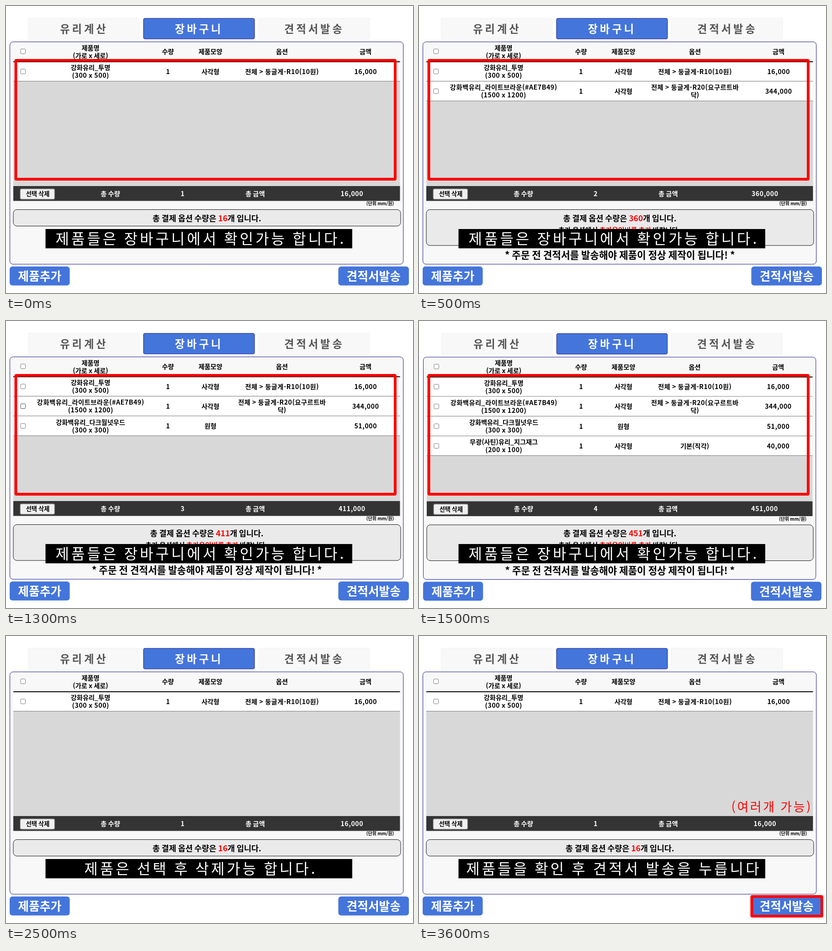
An HTML page with a canvas that plays this animation: 891x628 px, repeating every 4 s.

```html
<!DOCTYPE html>
<html lang="ko">
<head>
<meta charset="utf-8">
<title>장바구니</title>
<style>
  html, body { margin: 0; width: 100%; height: 100%; overflow: hidden; background: #fff; }
  canvas { display: block; }
</style>
</head>
<body>
<canvas id="stage" width="891" height="628"></canvas>
<script>
const ctx = document.getElementById('stage').getContext('2d');
const FONT = '"Noto Sans CJK KR", "Noto Sans CJK", "Noto Sans CJK JP", sans-serif';
const BLUE = '#4475db', NAVY = '#17178a', RED = '#ff0000';
const COLS = [185, 354.5, 447.5, 604, 787];
const ROW_H = 43.2;

const items = [
  { name: ['강화유리_투명', '(300 x 500)'], shape: '사각형', option: ['전체 > 둥글게-R10(10원)'], price: 16000 },
  { name: ['강화백유리_라이트브라운(#AE7B49)', '(1500 x 1200)'], shape: '사각형', option: ['전체 > 둥글게-R20(요구르트바', '닥)'], price: 344000 },
  { name: ['강화백유리_다크월넛우드', '(300 x 300)'], shape: '원형', option: [], price: 51000 },
  { name: ['무광(사틴)유리_지그재그', '(200 x 100)'], shape: '사각형', option: ['기본(직각)'], price: 40000 }
];

const captions = [
  '제품들은 장바구니에서 확인가능 합니다.',
  '제품은 선택 후 삭제가능 합니다.',
  '제품들을 확인 후 견적서 발송을 누릅니다'
];

// One scene per half second; the last one holds until the loop ends.
const listFrame = [[18.5, 116, 855, 382]];
const scenes = [
  { rows: 1, caption: 0, marks: listFrame },
  { rows: 2, caption: 0, marks: listFrame },
  { rows: 3, caption: 0, marks: listFrame, hover: 1 },
  { rows: 4, caption: 0, marks: listFrame, inset: true },
  { rows: 4, caption: 1, marks: [[22, 163, 53, 295], [27, 395, 111, 429]], inset: true, checked: true },
  { rows: 1, caption: 1, marks: [] },
  { rows: 1, caption: 2, marks: [[725.5, 567, 885, 616]], note: true }
];

function box(x1, y1, x2, y2, radius, fill, stroke, width = 1) {
  ctx.beginPath();
  ctx.roundRect(x1, y1, x2 - x1, y2 - y1, radius);
  if (fill) { ctx.fillStyle = fill; ctx.fill(); }
  if (stroke) { ctx.strokeStyle = stroke; ctx.lineWidth = width; ctx.stroke(); }
}

function setFont(size, weight, spacing) {
  ctx.font = `${weight} ${size}px ${FONT}`;
  ctx.letterSpacing = spacing + 'px';
}

// Centres a line of [string, colour] parts on (x, y).
function line(parts, x, y, size, { weight = 700, spacing = 0 } = {}) {
  setFont(size, weight, spacing);
  const widths = parts.map(([s]) => ctx.measureText(s).width);
  let left = x - (widths.reduce((a, b) => a + b) - spacing) / 2;
  parts.forEach(([s, color], i) => {
    ctx.fillStyle = color;
    ctx.fillText(s, left, y + size * 0.37);
    left += widths[i];
  });
}

const text = (s, x, y, size, color = '#000', style) => line([[s, color]], x, y, size, style);

function cell(s, x, y, color) {
  text(String(s), x, y, 14.2, color, { spacing: /\d/.test(s) ? 0.55 : 0 });
}

function lines(list, x, y) {
  list.forEach((s, i) => cell(s, x, y + (i - (list.length - 1) / 2) * 17));
}

function checkbox(y, checked, hover) {
  box(32, y - 5.2, 42.5, y + 5.2, 2, checked ? '#0b6bdc' : '#fff',
      checked ? '#0b6bdc' : hover ? '#444' : '#777');
  if (!checked) return;
  ctx.beginPath();
  ctx.moveTo(34, y);
  ctx.lineTo(36.4, y + 2.6);
  ctx.lineTo(40.7, y - 2.8);
  ctx.strokeStyle = '#fff';
  ctx.lineWidth = 1.8;
  ctx.stroke();
}

function tabs() {
  ['유리계산', '장바구니', '견적서발송'].forEach((label, i) => {
    const x = 48.5 + 252 * i, active = i === 1;
    box(x + (active ? 0.5 : 0), active ? 27 : 26.5, x + 243.5, 72, active ? 3 : 1,
        active ? BLUE : '#f8f8f8', active ? NAVY : '#f1f1f1');
    text(label, x + (active ? 119.5 : 120), 50, 23.3, active ? '#fff' : '#555', { spacing: 4.9 });
  });
}

function table({ rows, checked, hover }) {
  checkbox(99.2);
  lines(['제품명', '(가로 x 세로)'], COLS[0], 100);
  ['수량', '제품모양', '옵션', '금액'].forEach((s, i) => cell(s, COLS[i + 1], 100));

  box(16, 165, 862.5, 394, 0, '#d8d8d8');
  items.slice(0, rows).forEach((item, i) => {
    const y = 143.5 + ROW_H * i;
    box(16, y - 21.5, 862.5, y + 21, 0, '#fff');
    box(16, y + 20.5, 862.5, y + 21.5, 0, '#777');
    checkbox(y - 0.3, checked && i > 0, hover === i);
    lines(item.name, COLS[0], y);
    cell(1, COLS[1], y);
    cell(item.shape, COLS[2], y);
    lines(item.option, COLS[3], y);
    cell(item.price.toLocaleString('en-US'), COLS[4], y);
  });
  box(16, 121, 862.5, 123, 0, '#000');
}

function totals(rows, sum) {
  box(16, 394, 862.5, 426.5, 0, '#343434');
  box(31, 400, 106.5, 423, 3, '#f0f0f0', '#777', 1.3);
  text('선택 삭제', 69.5, 411.5, 13.2);
  cell('총 수량', 228.5, 410.5, '#fff');
  cell(rows, 386.5, 410.5, '#fff');
  cell('총 금액', 545.5, 410.5, '#fff');
  cell(sum.toLocaleString('en-US'), 757, 410.5, '#fff');
  text('(단위 mm/원)', 819, 432.5, 10);
}

function notice(rows, sum) {
  const many = rows > 1;
  box(16, 445.5, 864, many ? 524 : 481.5, 8, '#eaeaea', '#111');
  line([['총 결제 옵션 수량은 ', '#000'], [String(sum / 1000), RED], ['개 입니다.', '#000']], 439.7, 464.5, 17.4);
  if (!many) return;
  line([['추가 옵션에서 ', '#000'], ['추가운임비를 추가', RED], [' 바랍니다.', '#000']], 438.5, 490, 15);
  text('* 주문 전 견적서를 발송해야 제품이 정상 제작이 됩니다! *', 439.7, 545.5, 21.3);
}

function button(x1, x2, label) {
  box(x1, 570, x2, 611.5, 6, BLUE);
  text(label, (x1 + x2) / 2, 591.5, 25.8, '#fff', { weight: 900 });
}

function draw(scene) {
  const { rows } = scene;
  const sum = items.slice(0, rows).reduce((total, item) => total + item.price, 0);
  box(0, 0, 891, 628, 0, '#fff');

  ctx.save();
  if (scene.inset) {
    ctx.translate(439.5, 0.5);
    ctx.scale(0.9977, 1);
    ctx.translate(-439.5, 0);
  }
  tabs();
  box(8.5, 78.5, 869.8, 565, 7, '#f8f8f8', NAVY);
  table(scene);
  totals(rows, sum);
  notice(rows, sum);
  button(8, 139.5, '제품추가');
  button(727.5, 882, '견적서발송');
  ctx.restore();

  box(86.5, 488, 758, 530.3, 0, '#000');
  text(captions[scene.caption], 424, 509, 32, '#fff', { weight: 300, spacing: 5 });
  if (scene.note) text('(여러개 가능)', 770.5, 374, 27, RED, { weight: 300, spacing: 3.6 });
  scene.marks.forEach(([x1, y1, x2, y2]) => box(x1 + 3, y1 + 3, x2 - 3, y2 - 3, 1, null, RED, 6));
}

function tick() {
  const step = Math.floor(performance.now() % 4000 / 500);
  draw(scenes[Math.min(step, scenes.length - 1)]);
  requestAnimationFrame(tick);
}
tick();
</script>
</body>
</html>
```
